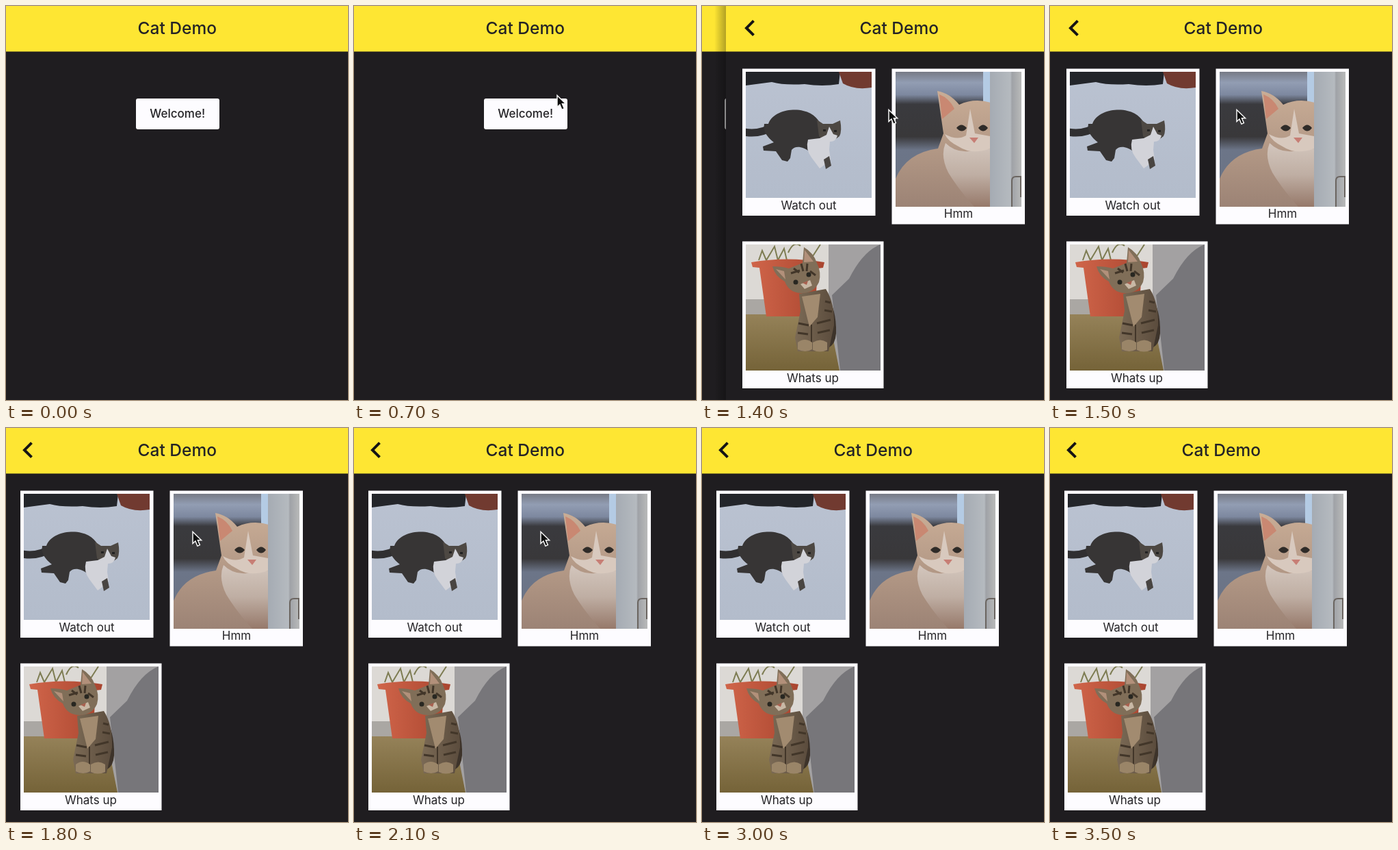
An HTML page that plays this animation: 500x575 px, repeating every 3.6 s.

```html
<!DOCTYPE html>
<html lang="en">
<head>
<meta charset="utf-8">
<title>Cat Demo</title>
<style>
  html, body { margin: 0; width: 100%; height: 100%; overflow: hidden; background: #1f1d20; }
  svg { display: block; }
  text { font: 17px Inter, "Open Sans", sans-serif; fill: #242326; text-anchor: middle; }
  .title { font-size: 24.5px; font-weight: 500; }
  .label { font-weight: 500; }
</style>
</head>
<body>
<svg width="500" height="575" viewBox="0 0 500 575">
  <defs>
    <linearGradient id="edge"><stop stop-opacity="0"/><stop offset="1" stop-opacity=".3"/></linearGradient>
    <linearGradient id="snow" x2="0" y2="1"><stop stop-color="#bac2d1"/><stop offset="1" stop-color="#b3bccb"/></linearGradient>
    <linearGradient id="yard" x2="0" y2="1">
      <stop stop-color="#777b86"/><stop offset=".08" stop-color="#929db3"/><stop offset=".17" stop-color="#7d889f"/>
      <stop offset=".24" stop-color="#3a3a3e"/><stop offset=".48" stop-color="#39383a"/><stop offset=".58" stop-color="#6c7588"/><stop offset="1" stop-color="#6b7383"/>
    </linearGradient>
    <linearGradient id="post"><stop stop-color="#a5abb3"/><stop offset=".65" stop-color="#b5babf"/><stop offset=".7" stop-color="#9fa2a7"/><stop offset="1" stop-color="#b9bab9"/></linearGradient>
    <linearGradient id="fur" x2="0" y2="1"><stop stop-color="#c9ad96"/><stop offset="1" stop-color="#9c8375"/></linearGradient>
    <linearGradient id="chest" x2="0" y2="1"><stop stop-color="#d3c6bd"/><stop offset=".5" stop-color="#bfaea3"/><stop offset="1" stop-color="#96796a"/></linearGradient>
    <linearGradient id="ground" x2="0" y2="1"><stop stop-color="#958259"/><stop offset="1" stop-color="#756338"/></linearGradient>
    <linearGradient id="clay"><stop stop-color="#d0654a"/><stop offset="1" stop-color="#a9452f"/></linearGradient>
    <linearGradient id="tabby"><stop stop-color="#7b6a55"/><stop offset="1" stop-color="#5b4c3d"/></linearGradient>
    <clipPath id="btn"><rect x="190" y="135" width="122" height="45" rx="3"/></clipPath>
    <clipPath id="p1"><path d="M26 96h184v184H26z"/></clipPath>
    <clipPath id="p2"><path d="M245 96h184v197H245z"/></clipPath>
    <clipPath id="p3"><path d="M26 348h197v184H26z"/></clipPath>
  </defs>

  <g id="home">
    <path fill="#1f1d20" d="M0 0h510v575H0z"/>
    <path fill="#fee633" d="M0 0h510v66.500H0z"/>
    <text class="title" x="250.3" y="41">Cat Demo</text>
    <g clip-path="url(#btn)">
      <path id="face" d="M190 135h122v45H190z"/>
      <circle id="ripple" cx="273" cy="151" fill="#d1cfd0"/>
    </g>
    <text class="label" x="250.7" y="163">Welcome!</text>
  </g>

  <g id="gallery">
    <path fill="url(#edge)" d="M-20 0h17v575h-17z"/>
    <path fill="#1f1d20" d="M-3 0h510v575H-3z"/>
    <path fill="#fee633" d="M-3 0h510v66.500H-3z"/>
    <path fill="none" stroke="#161414" stroke-width="4" d="M37.500 21.700L27 32.200 37.500 42.700"/>
    <text class="title" x="250.3" y="41">Cat Demo</text>
    <path fill="#fdfcff" d="M21 91.500h194.500V306H21zM239.500 91.500h194.500v227H239.500zM21 343.500h206.500V558H21z"/>
    <text x="118" y="296.500">Watch out</text>
    <text x="337" y="308.500">Hmm</text>
    <text x="124" y="548.500">Whats up</text>

    <!-- snow -->
    <g clip-path="url(#p1)">
      <path fill="url(#snow)" d="M26 96h184v184H26z"/>
      <path fill="#23252a" d="M26 96h138l-2 18q-24 4-50 0-30 2-48-3l-38 5z"/>
      <path fill="#713a30" d="M162 96h48v23q-25 4-42-6z"/>
      <path fill="none" stroke="#302f31" stroke-width="11" d="M24 184q22 4 42-8"/>
      <path fill="#373535" d="M59 172C66 153 94 149 110 153c16 3 24 14 28 26l2 28-20 6c-12-9-22-9-27-3l-2 12-4 5-8-2-9-13-18-1-1-6 16-6c-10-8-16-16-14-27z"/>
      <path fill="#4d4843" d="M130 166l9 6h14l11-5q3 15-1 23-15 13-30 0z"/>
      <path fill="#d2d3d9" d="M148 176l6 11 6 2q-2 9-11 9l-1 12 2 14-9 8-7 5-12-16q-9-12-5-26l17-2 10-5z"/>
      <path fill="#494542" d="M140 224l8-5 3 14-8 5z"/>
      <path fill="#222" d="M139 180h4v3h-4zM155 181h4v3h-4z"/>
    </g>

    <!-- doorway -->
    <g clip-path="url(#p2)">
      <path fill="url(#yard)" d="M245 96h184v197H245z"/>
      <path fill="#b4cbe4" d="M373 96h11v60h-11z"/>
      <path fill="url(#fur)" d="M245 252q16-38 62-44l8-22-9-62q18 3 32 20 22-10 46-3v152H245z"/>
      <path fill="#c98872" d="M309 129q15 6 22 21l-18 15z"/>
      <path fill="url(#chest)" d="M318 200q14 14 34 12l32-4v85h-24q-22-24-38-50-12-24-4-43z"/>
      <path fill="#d8c9be" d="M354 150l7 36 22 4v18q-26 10-46-3-16-8-20-18 18 10 31 2z"/>
      <path fill="#2f2b28" d="M334 178q7-9 15 0-7 9-15 0zM366 178q7-9 14 0-7 9-14 0z"/>
      <path fill="#c77e75" d="M353 192h13l-6 8z"/>
      <path fill="url(#post)" d="M383 96h46v197h-46z"/>
      <path fill="none" stroke="#6b6560" stroke-width="2" d="M415 293v-38q0-6 6-6h7v30"/>
    </g>

    <!-- flower pot -->
    <g clip-path="url(#p3)">
      <path fill="#dcd9d5" d="M26 348h197v184H26z"/>
      <path fill="#aaa7a3" d="M26 428h130v25H26z"/>
      <path fill="url(#ground)" d="M26 450h160v82H26z"/>
      <path fill="none" stroke="#7d7c52" stroke-width="2" d="M45 371l5-14 6 14 12-20 5 20 9-17 4 17M88 360q8-18 18-10M124 365l11-17"/>
      <path fill="url(#clay)" d="M34 374q52-9 107 0l-2 8-8 1-4 70H56l-10-71-10-1z"/>
      <path fill="#a3a1a2" d="M147 348h76v184h-60l-16-80z"/>
      <path fill="#77767a" d="M223 348q-26 10-46 50l-25 24 12 110h59z"/>
      <path fill="#3d332a" d="M142 420q17 20 16 58-1 15-10 20l-9-40z"/>
      <path fill="url(#tabby)" d="M104 420l39-7q13 20 12 53l-8 38H102l-4-20 8-39z"/>
      <path fill="#806e58" d="M65 380q14 0 24 3l20-8 2-23q14 8 19 23 7 14 3 28-8 17-27 16-17-1-23-17-14-7-18-22z"/>
      <path fill="#b2907a" d="M70 384l12 3 2 12zM112 356l13 17-14 1z"/>
      <path fill="#a28b70" d="M108 424l27-4-4 34-12 14z"/>
      <path fill="none" stroke="#423629" stroke-width="3" d="M92 390l13-4M96 383l8 6M107 376l3 11M116 376l-1 11M128 393l-8-6M103 463l15 3M102 477l15 2M130 463l20-5M131 477l18-4M142 431l8 2M141 444l11 2"/>
      <path fill="none" stroke="#423629" stroke-width="2" d="M122 465v34"/>
      <circle cx="99" cy="403" r="3.500" fill="#282721"/><circle cx="118" cy="392" r="3.500" fill="#282721"/>
      <path fill="#c8b8a5" d="M106 406l14-6 3 8-11 5z"/>
      <path fill="#a8604f" d="M109 404l8-3-2 6z"/>
      <path fill="#9a8568" d="M102 491q10-8 21 0v10q-10 6-21 0zM124 491q11-7 21 0v11q-11 5-21 0z"/>
    </g>
  </g>

  <path id="cursor" fill="#0b0b0b" stroke="#f5f5f5" stroke-width="1.500" d="M0 .5v17l3.900-3.500 3 7.200 3.500-1.500-3-6.900h5.200z"/>
</svg>
<script>
const $ = id => document.getElementById(id);
const home = $("home"), gallery = $("gallery"), face = $("face"), ripple = $("ripple"), cursor = $("cursor");
const STEP = 100, STEPS = 36, WIDTH = 508;
const PRESS = 12, PUSH = 13, APPEAR = 2, HIDE = 30;
const slide = [289, 38, 3, 1, 0];
const path = [[431, 26], [420, 34], [398, 51], [370, 72], [338, 97], [297, 130], [280, 146], [273, 151]];
const hold = (list, i) => list[Math.min(i, list.length - 1)];
const move = (el, x, y = 0) => el.setAttribute("transform", `translate(${x} ${y})`);
const show = (el, on) => el.setAttribute("visibility", on ? "visible" : "hidden");

function draw(now) {
  const n = Math.floor(now / STEP) % STEPS;
  const pushed = n >= PUSH, pressed = n >= PRESS;
  const x = pushed ? hold(slide, n - PUSH) : WIDTH;
  move(home, (x - WIDTH) / 3);
  move(gallery, x);
  show(gallery, pushed);

  face.setAttribute("fill", pressed ? "#e4e2e4" : "#fdfcff");
  ripple.setAttribute("r", pressed ? 35 + 40 * (n - PRESS) : 0);

  const visible = n >= APPEAR && n < HIDE;
  show(cursor, visible);
  if (visible) move(cursor, ...hold(path, n - APPEAR));
  requestAnimationFrame(draw);
}
draw(0);
</script>
</body>
</html>
```
